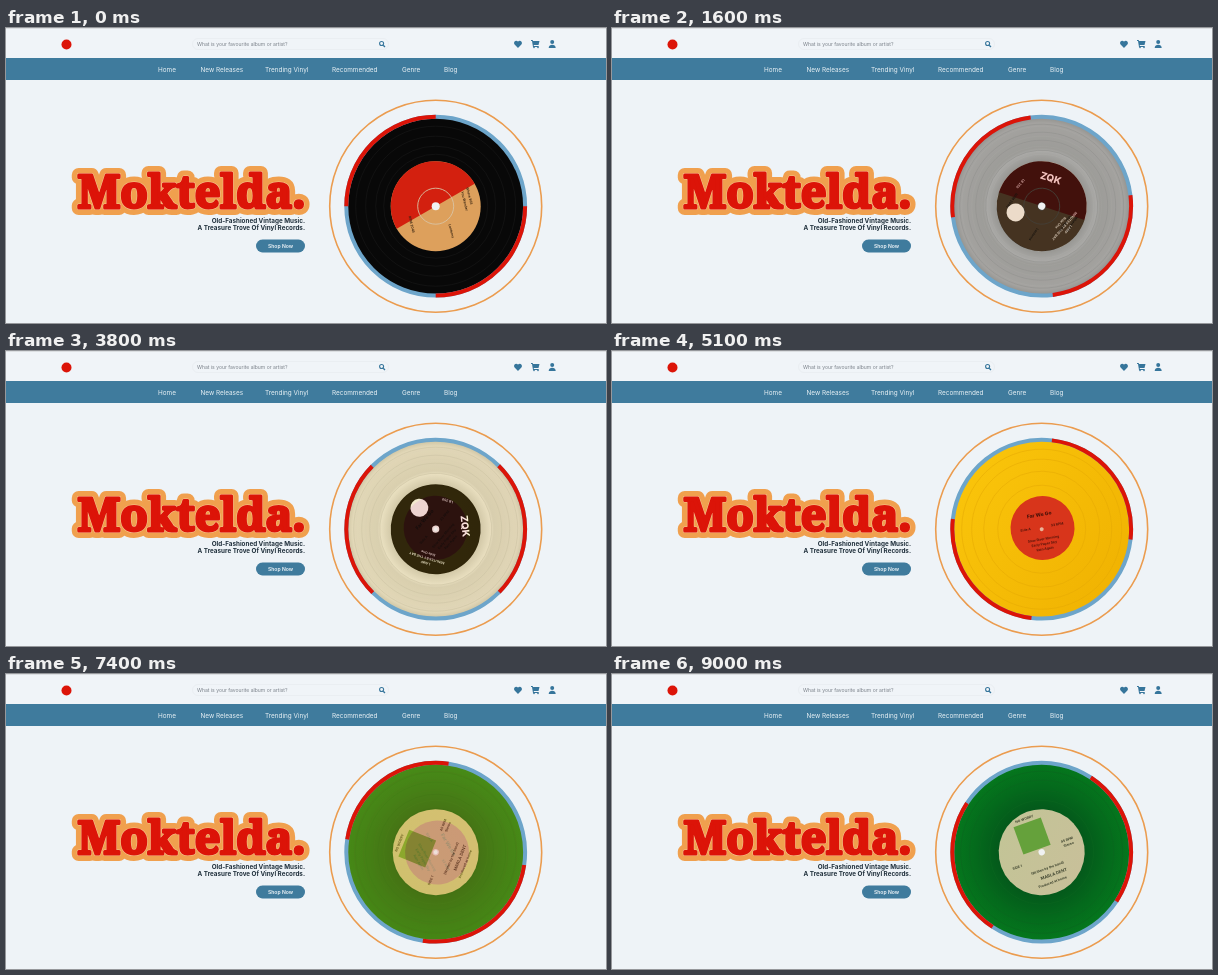
Write an HTML page that moves like this. It is 600x295 px and loops after 9.1 s.

```html
<!DOCTYPE html>
<html lang="en">
<head>
<meta charset="utf-8">
<title>Record shop</title>
<style>
html, body { margin: 0; width: 100%; height: 100%; overflow: hidden; background: #eef3f7; }
svg { display: block; width: 600px; height: 295px; font-family: Inter, "Open Sans", sans-serif; }
.nav { font-size: 6.4px; font-weight: 400; fill: #eaf2f6; }
.tag { font-size: 6.3px; font-weight: 700; fill: #20303c; text-anchor: end; }
.title { font: 900 45px "Noto Serif", serif; text-anchor: middle; stroke-linejoin: round; }
.small { font-size: 3.4px; font-weight: 600; text-anchor: middle; }
.icon { fill: #36759b; }
.groove { fill: none; stroke-width: .5; }
</style>
</head>
<body>
<svg viewBox="0 0 600 295">
  <defs>
    <radialGradient id="clear">
      <stop offset=".5" stop-color="#cbcac5"/>
      <stop offset=".62" stop-color="#e6e5e1"/>
      <stop offset=".66" stop-color="#d4d3ce"/>
      <stop offset=".94" stop-color="#dedcd8"/>
      <stop offset="1" stop-color="#c8c7c1"/>
    </radialGradient>
    <linearGradient id="yellow" x2="1" y2="1">
      <stop stop-color="#fbc70c"/><stop offset="1" stop-color="#efb000"/>
    </linearGradient>
    <radialGradient id="green">
      <stop offset=".5" stop-color="#045a1b"/>
      <stop offset=".75" stop-color="#046a1c"/>
      <stop offset="1" stop-color="#05771d"/>
    </radialGradient>
    <linearGradient id="khaki" x2="1" y2="1">
      <stop stop-color="#c2c596"/><stop offset="1" stop-color="#c9bf9a"/>
    </linearGradient>
  </defs>

  <rect width="600" height="295" fill="#eef3f7"/>
  <rect width="600" height="30" fill="#f0f4f8"/>
  <rect width="600" height="1" fill="#dcdfe2"/>
  <circle cx="60.5" cy="16.5" r="5" fill="#dc1408"/>
  <rect x="186.5" y="10.5" width="196" height="11" rx="5.5" fill="none" stroke="#eaeef2"/>
  <text x="191" y="17.8" font-size="5.05" fill="#7b828a">What is your favourite album or artist?</text>
  <g class="icon">
    <path d="M377.2 17.2l1.8 1.8" stroke="#36759b" stroke-width="1.3"/>
    <circle cx="375.6" cy="15.5" r="2" fill="none" stroke="#36759b" stroke-width="1.1"/>
    <path d="M512 20l-3.4-3.5c-1.7-2 .9-5.3 3.4-2.9c2.5-2.4 5.1.9 3.4 2.9z"/>
    <path d="M525 12h1.7l.3 1h6.5l-1 4h-4.8l.2 1h4.8v.9h-5.7l-1-6h-1z"/>
    <circle cx="528" cy="19.5" r=".8"/><circle cx="532" cy="19.5" r=".8"/>
    <circle cx="546.2" cy="14" r="2"/>
    <path d="M542.7 20c0-4.2 7-4.2 7 0z"/>
  </g>

  <rect y="30" width="600" height="22" fill="#3f7b9d"/>
  <g class="nav">
    <text x="152" y="43.5">Home</text>
    <text x="194.5" y="43.5">New Releases</text>
    <text x="259" y="43.5">Trending Vinyl</text>
    <text x="326" y="43.5">Recommended</text>
    <text x="396" y="43.5">Genre</text>
    <text x="438" y="43.5">Blog</text>
  </g>

  <g class="title">
    <text x="185.5" y="179.5" fill="#f0a04e" stroke="#f0a04e" stroke-width="14">Moktelda.</text>
    <text x="185.5" y="179.5" fill="#f6c795" stroke="#f6c795" stroke-width="4">Moktelda.</text>
    <text x="185.5" y="179.5" fill="#dc1408" stroke="#dc1408" stroke-width="3">Moktelda.</text>
  </g>
  <g class="tag">
    <text x="299" y="194.7">Old-Fashioned Vintage Music.</text>
    <text x="299" y="202.2">A Treasure Trove Of Vinyl Records.</text>
  </g>
  <rect x="250" y="211.5" width="49" height="13" rx="6.5" fill="#3f7b9d"/>
  <text x="274.5" y="219.8" font-size="5.1" font-weight="600" fill="#f4f8fb" text-anchor="middle">Shop Now</text>

  <g transform="translate(429.7 178.2)">
    <circle r="106" fill="none" stroke="#eb9c4f" stroke-width="1.6"/>

    <g class="disc">
      <circle r="88.5" fill="#080808"/>
      <g class="groove" stroke="#1d1d1d"><circle r="80"/><circle r="70"/><circle r="60"/><circle r="52"/></g>
      <circle r="45" fill="#dda05c"/>
      <path d="M-45 0a45 45 0 0 1 90 0z" fill="#d3200f" transform="rotate(-30)"/>
      <circle r="18" fill="none" stroke="#d8c3a4" stroke-width=".9"/>
      <g class="small" fill="#33200f" transform="rotate(76)">
        <text x="-2" y="-34">Where Will</text>
        <text x="2" y="-28">You Wander</text>
        <text x="28" y="-8">Lanterns</text>
        <text x="12" y="29">RPM 2045</text>
      </g>
      <circle r="4" fill="#f0f2f2"/>
    </g>

    <g class="disc">
      <circle r="88.5" fill="url(#clear)"/>
      <g class="groove" stroke="#c3c3bf"><circle r="82"/><circle r="74"/><circle r="66"/><circle r="56"/></g>
      <circle r="45" fill="#0d0c0c"/>
      <text y="-26" font-size="10" font-weight="800" fill="#fff" text-anchor="middle">ZQK</text>
      <circle cx="-23" cy="14" r="9" fill="#f2f2f2"/>
      <g class="small" fill="#ddd" transform="rotate(113)">
        <text y="-34">LAMP</text>
        <text y="-29">MINUTES BY THE BAY</text>
        <text y="-24">Side One</text>
        <text x="-3" y="32">LB 259</text>
      </g>
      <circle r="3.6" fill="#f0f2f2"/>
    </g>

    <g class="disc">
      <circle r="88.5" fill="url(#yellow)"/>
      <g class="groove" stroke="#e5aa05"><circle r="80"/><circle r="70"/><circle r="58"/><circle r="44"/></g>
      <circle r="32" cx="1" cy="-1" fill="#d8351b"/>
      <g class="small" fill="#4a1209">
        <text y="-13" font-size="5" font-weight="800">Far We Go</text>
        <text x="-16" y="-1">Side A</text>
        <text x="16" y="-1">33 RPM</text>
        <text y="11">Slow River Morning</text>
        <text y="16">Early Paper Sky</text>
        <text y="21">Rain Again</text>
      </g>
      <circle r="2" fill="#e9b49a"/>
    </g>

    <g class="disc">
      <circle r="88.5" fill="url(#green)"/>
      <g class="groove" stroke="#0b6620"><circle r="81"/><circle r="72"/><circle r="62"/><circle r="52"/></g>
      <circle r="43" fill="url(#khaki)"/>
      <rect x="-18" y="-33" width="29" height="29" fill="#65a13b"/>
      <g class="small" fill="#2e3523">
        <text x="-5" y="-36">NO WORRY</text>
        <text x="-28" y="7">SIDE 1</text>
        <text x="28" y="-2">45 RPM</text>
        <text x="28" y="3">Stereo</text>
        <text y="18">(Written by the band)</text>
        <text x="4" y="26" font-size="4.2">MARLA DENT</text>
        <text y="33">Produced at home</text>
      </g>
      <circle r="3.2" fill="#f0f2f2"/>
    </g>

    <g id="ring" fill="none" stroke-width="4">
      <circle r="89.4" stroke="#6da5ca"/>
      <circle r="89.4" stroke="#dc1408" pathLength="4" stroke-dasharray="1 1"/>
    </g>
  </g>
</svg>
<script>
const LOOP = 9.1, SPIN = 30;
const ring = document.getElementById('ring');
const discs = [...document.querySelectorAll('.disc')];
// Start angle and fade-in interval (seconds) of each record.
const plan = [
  { angle: 0, from: -2, to: -1 },
  { angle: -30, from: 0, to: 2.5 },
  { angle: -163, from: 3.35, to: 5 },
  { angle: 70, from: 6, to: 8.2 }
];

// cubic-bezier(.42, 0, .58, 1)
function easeInOut(x) {
  x = Math.min(1, Math.max(0, x));
  let low = 0, high = 1, s = x;
  for (let i = 0; i < 20; i++) {
    const bx = 1.26 * s * (1 - s) ** 2 + 1.74 * s * s * (1 - s) + s ** 3;
    if (bx < x) low = s; else high = s;
    s = (low + high) / 2;
  }
  return s * s * (3 - 2 * s);
}

function draw(now) {
  const t = Math.floor(now / 100) % (LOOP * 10) / 10;
  ring.setAttribute('transform', `rotate(${-360 * easeInOut((t - .1) / 15)})`);
  plan.forEach(({ angle, from, to }, i) => {
    discs[i].setAttribute('transform', `rotate(${angle + SPIN * t})`);
    discs[i].setAttribute('opacity', easeInOut((t - from) / (to - from)));
  });
  requestAnimationFrame(() => draw(performance.now() - start));
}
const start = performance.now();
draw(0);
</script>
</body>
</html>
```
